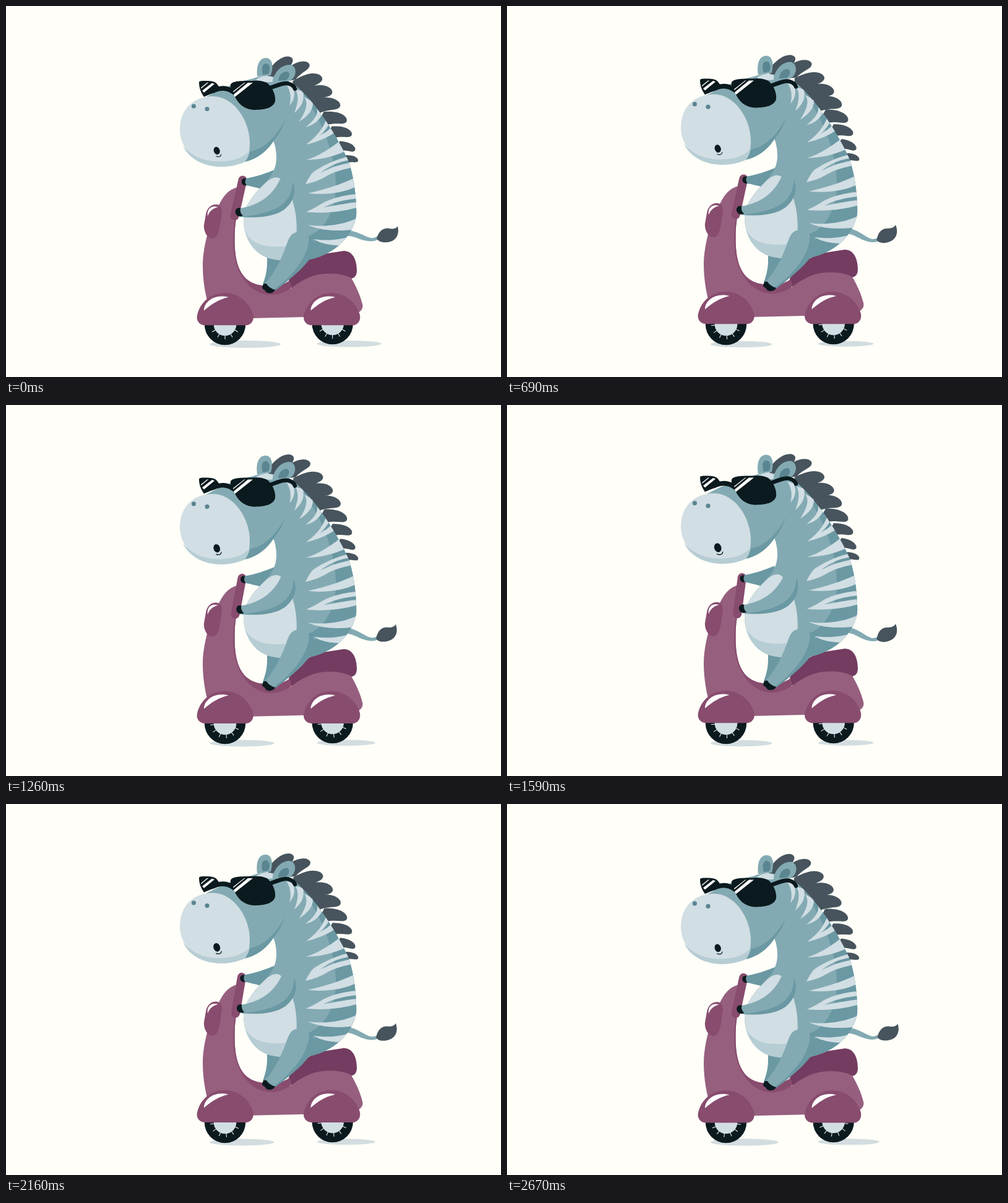
Animation of 800x600 px, one loop 2700 ms. Source, as an HTML page:

```html
<!DOCTYPE html>
<html lang="en">
<head>
<meta charset="utf-8">
<title>Zebra on a scooter</title>
<style>
  html, body { margin: 0; width: 100%; height: 100%; overflow: hidden; background: #fffef8; }
  svg { display: block; }
  .mid { fill: #83aab3; } .dark { fill: #6a98a3; } .deep { fill: #5a8591; }
  .light { fill: #d1dee3; } .shade { fill: #b6cdd4; } .mane { fill: #47545d; }
  .black { fill: #0b1a1e; } .white { fill: #fff; }
  .plum { fill: #965f7e; } .plumDark { fill: #884c6e; } .seat { fill: #733c60; }
  .line { fill: none; stroke: #0b1a1e; stroke-linecap: round; }
</style>
</head>
<body>
<svg width="800" height="600" viewBox="0 0 800 600">
  <defs>
    <g id="fender">
      <path class="plumDark" d="M322 516.300C312 516.300 307 508 309 500C314 478 332 464 353 464C378 464 394 482 399 498C402 508 396 516.300 388 516.300Z"/>
      <path class="white" d="M320 492.500C320 479 336 465 359.500 471C345 474 332 482 320 492.500Z"/>
    </g>
    <g id="wheel">
      <circle class="black" r="33.2"/>
      <circle class="light" r="18.3"/>
    </g>
    <path id="tuft" d="M0 0L-14-10L-4-26C8-25 30-22 37-8C40 0 35 4 25 2C15 0 6-1 0 0Z"/>
    <path id="body" d="M440 118L470 130C500 157 533 205 554 252C565 285 567 325 566 340C560 372 532 402 490 410C465 413 445 413 425 408C400 400 384 375 384 345C384 325 400 305 415 290C430 275 437 262 437 245C437 235 435 225 432 218Z"/>
    <clipPath id="inBody"><use href="#body"/></clipPath>
  </defs>

  <g id="shadowFront" fill="#d3dde0"><ellipse cx="57.5" rx="57.5" ry="6"/></g>
  <g id="shadowRear" fill="#d3dde0"><ellipse cx="52" rx="52" ry="5.3"/></g>
  <g transform="translate(354 515)"><use href="#wheel"/><g class="spokes"/></g>
  <g transform="translate(527.7 514)"><use href="#wheel"/><g class="spokes"/></g>

  <g class="rider">
    <path class="dark" d="M422 400L422 415C422 430 418 442 415 450L427 457C437 440 450 425 458 405Z"/>
  </g>

  <g id="scooter">
    <path class="seat" d="M457 443C468 425 488 404 520 400L546 396C560 396 567 410 567 428C567 436 563 441 556 441L462 457Z"/>
    <path class="plum" d="M374 293C358 297 350 310 344 322C331 345 318 387 318 420C318 440 321 460 325 476L395 505L482 503L560 500C573 496 578 490 576 482C572 466 564 450 558 440C545 432 515 430 495 437C478 443 468 451 460 457L428 453C412 453 398 450 388 441C372 425 368 400 370 360L378 300Z"/>
    <path class="plumDark" d="M372 330L370 360C368 400 372 425 388 441C398 450 412 453 428 453C444 452 453 448 458 444L462 455C452 463 438 468 425 467C400 465 384 446 375 425C367 405 366 385 368 360Z"/>
    <path class="plumDark" d="M323 337C325 325 333 320 341 321C349 322 350 330 348 340C346 355 344 376 334 376C324 376 319 362 320 354Z"/>
    <path class="white" d="M326 340C324 328 332 322 343 325C335 327 329 331 326 340Z"/>
    <use href="#fender"/>
    <use href="#fender" x="172.5"/>
    <g id="handlebar"><path d="M382.5 281.500L369.500 339.500" stroke="#884c6e" stroke-width="14" stroke-linecap="round"/></g>
  </g>

  <g class="rider">
    <g id="tail">
      <path class="mid" d="M545 362C568 363 577 372 589 375C593 376 597 374 601 372L602 377C595 382 585 381 575 378C565 375 560 371 545 372Z"/>
      <path id="tailTip" class="mane" d="M599 376C603 362 612 358 620 360C628 361 631 359 633 356C636 368 632 380 617 382C608 383 602 381 599 376Z"/>
    </g>
    <g id="farArm">
      <path class="dark" d="M387 279C405 276 422 270 436 264L446 285L413 296C405 294 395 291 387 290Z"/>
      <path class="black" d="M388 279C382 278 380 282 381 286C382 290 386 291 389 290C386 287 386 282 388 279Z"/>
    </g>
    <g id="mane" class="mane"></g>

    <use href="#body" class="mid"/>
    <g clip-path="url(#inBody)">
      <path class="dark" d="M474 134L540 200L570 300V420H490L489 372C512 364 532 335 533 295C534 235 505 175 474 134Z"/>
      <g class="light">
        <path d="M468 135C475 148 470 162 466 173C478 162 483 153 480 138Z"/>
        <path d="M482 147C489 157 485 170 474 187C488 178 497 168 496 155Z"/>
        <path d="M502 165C506 174 498 185 484 196C500 192 508 182 511 175Z"/>
        <path d="M518 182C512 200 500 213 485 224C503 220 520 213 534 203L528 194C520 203 512 207 506 210C514 204 520 196 523 189Z"/>
        <path d="M541 217C525 230 505 243 485 249C510 249 530 243 551 234Z"/>
        <path d="M556 243C535 247 512 258 497 268C492 273 488 280 484 288C500 285 510 280 520 274C535 266 548 264 560 261V253C535 257 522 263 508 270C522 258 540 251 558 249Z"/>
        <path d="M566 277C540 289 515 297 488 303C515 306 545 303 568 291Z"/>
        <path d="M570 304C545 305 520 313 508 321C500 326 492 330 485 333C510 336 545 333 570 325V317C550 319 530 323 513 326C530 317 550 313 570 311Z"/>
        <path d="M570 342C545 354 515 358 488 354C505 363 540 366 570 360Z"/>
        <path d="M560 371C540 379 518 380 497 377C510 385 528 388 548 387Z"/>
        <path d="M384 345C384 325 400 305 415 290C425 280 433 275 441 278C448 281 460 300 464 318C472 345 471 375 465 395L455 414H384Z"/>
      </g>
      <path class="shade" d="M384 361C397 387 420 392 456 388V414H384Z"/>
    </g>

    <path class="mid" d="M470 366C456 368 455 385 448 400C440 420 428 440 417 450L433 460C450 448 478 425 491 408L500 380Z"/>
    <path class="dark" d="M490 373C490 400 470 432 431 460L435 460C452 448 478 427 491 409L502 385Z"/>
    <path class="black" d="M417 449C413 453 413 458 418 459C420 465 428 466 433 462L435 459C428 457 423 453 421 449Z"/>

    <g id="nearArm">
      <path class="mid" d="M443 280C432 305 410 322 379 327L378 341C420 344 455 335 464 310C468 300 467 292 463 284Z"/>
      <path class="dark" d="M464 284C469 300 466 315 450 329C432 342 405 343 378 341C425 337 456 325 462 295Z"/>
      <path class="black" d="M379 327C373 325 369.500 330 371 335C373 341 379 341 383 339C379 336 378 331 379 327Z"/>
    </g>

    <path class="mid" d="M318 150C338 139 365 125 400 117C415 111 430 112 445 118L466 128L458 200L432 219C420 236 405 248 386 252Z"/>
    <path class="light" d="M404 119C414 111 428 112 436 118L430 123L410 123Z"/>
    <path class="light" d="M453 127C461 138 461 152 458 161C467 152 468 140 463 130Z"/>
    <path class="dark" d="M451 184C436 214 415 232 392 236L385 252C408 247 422 234 432 219C442 207 447 196 451 184Z"/>
    <path class="light" d="M281 200C281 165 305 146 334 146C368 146 394 185 394 222C394 238 390 246 386 252C375 257 362 260 348 260C310 260 281 232 281 200Z"/>
    <path class="shade" d="M286 226C305 250 335 253 355 251C375 249 387 242 394 234C393 241 390 247 386 252C375 257 362 260 348 260C318 260 295 246 286 226Z"/>
    <circle class="deep" cx="303.400" cy="162" r="3.600"/>
    <circle class="deep" cx="325" cy="166.500" r="3.600"/>
    <g id="mouth">
      <ellipse class="black" rx="4.900" ry="6.400" transform="rotate(-18)"/>
      <path class="line" stroke-width="1.200" d="M-1 9Q6 11.500 7 6"/>
    </g>

    <g id="earLeft">
      <path class="mid" d="M406 114C404 95 410 84 420 84C430 84 433 96 428 112Z"/>
      <path class="deep" d="M415 111C412 100 415 93 420 93C427 93 428 103 424 110Z"/>
    </g>
    <g id="earRight">
      <path class="mid" d="M431 119C436 103 448 94 460 95C470 98 470 112 462 119C455 124 440 124 431 122Z"/>
      <path class="deep" d="M440 121C441 111 447 106 455 106C460 109 458 117 452 120Z"/>
    </g>

    <g id="glasses">
      <path class="line" stroke-width="7.500" d="M342 134.500C350 132 360 133 369 140"/>
      <path class="line" stroke-width="6.500" d="M425 133C440 128 450 123 458 126C464 128 466 131 467 134"/>
      <path class="black" d="M363 127C366 121 380 121 398 121C410 120 420 122 424 126C432 134 436 145 435 154C432 165 418 168 400 168C385 167 374 158 368 142C364 137 362 131 363 127Z"/>
      <path class="black" d="M312 124C312 121 315 121 322 121C332 121 338 122 341 126L346 133C345 140 334 140 320 147C315 140 312 132 312 124Z"/>
      <path class="white" d="M368 143L391 124H399L370 147ZM367 138L385 124H386.500L367.500 139.500ZM317 137L333 124.500L337 126L320 140ZM315 132L325 124H327L315.500 133.500Z"/>
    </g>
  </g>
</svg>
<script>
const $ = id => document.getElementById(id);
const all = selector => [...document.querySelectorAll(selector)];
const move = (el, value) => el.setAttribute('transform', value);

// base x, base y, length, angle
const tufts = [
  [446, 118, 37, -62], [468, 119, 33, -46], [482, 140, 37, -37],
  [494, 156, 37, -25], [507, 173, 35, -18], [520, 192, 31, -9],
  [532, 213, 27, -8], [542, 234, 22, 0], [552, 253, 17, -6]
];
$('mane').innerHTML = '<use href="#tuft"/>'.repeat(tufts.length);
const tuftEls = [...$('mane').children];

const spokes = Array.from({ length: 12 }, (_, i) =>
  `<path d="M0 18V24" transform="rotate(${i * 30})" stroke="#fff"/>`).join('');
all('.spokes').forEach(el => el.innerHTML = spokes);

// 0 to 1 and back over one period
const triangle = phase => 1 - Math.abs(1 - 2 * (phase % 1));

function draw(now) {
  const step = Math.floor(now % 2700 / 30);
  const bounce = 5 * triangle(step / 10);
  const steer = triangle(step / 22.5);

  const shrink = 1 - 0.0455 * bounce;
  move($('shadowFront'), `translate(329 547) scale(${shrink})`);
  move($('shadowRear'), `translate(502.5 546.3) scale(${shrink})`);
  all('.spokes').forEach(el => move(el, `rotate(${-8 * step})`));

  move($('scooter'), `translate(0 ${-0.68 * bounce})`);
  all('.rider').forEach(el => move(el, `translate(0 ${-1.1 * bounce})`));
  move($('handlebar'), `rotate(${-7.4 * steer} 376 310)`);
  move($('farArm'), `translate(${-6 * steer} ${-0.5 * steer})`);
  move($('nearArm'), `translate(${6 * steer} ${-1 * steer})`);
  move($('glasses'), `translate(0 ${-4.5 * steer})`);
  move($('mouth'), `translate(340.700 234) scale(${1 + 0.22 * steer})`);

  move($('earLeft'), `rotate(${-bounce} 417 115)`);
  move($('earRight'), `rotate(${-bounce} 438 122)`);
  move($('tail'), `rotate(${2.4 * bounce} 552 367)`);
  move($('tailTip'), `rotate(${-5.4 * bounce} 600 376)`);
  tufts.forEach(([x, y, length, angle], i) =>
    move(tuftEls[i], `translate(${x} ${y}) rotate(${angle + 1.6 * bounce}) scale(${length / 37})`));
}

let start;
function tick(now) {
  start ??= now;
  draw(now - start);
  requestAnimationFrame(tick);
}
draw(0);
requestAnimationFrame(tick);
</script>
</body>
</html>
```
